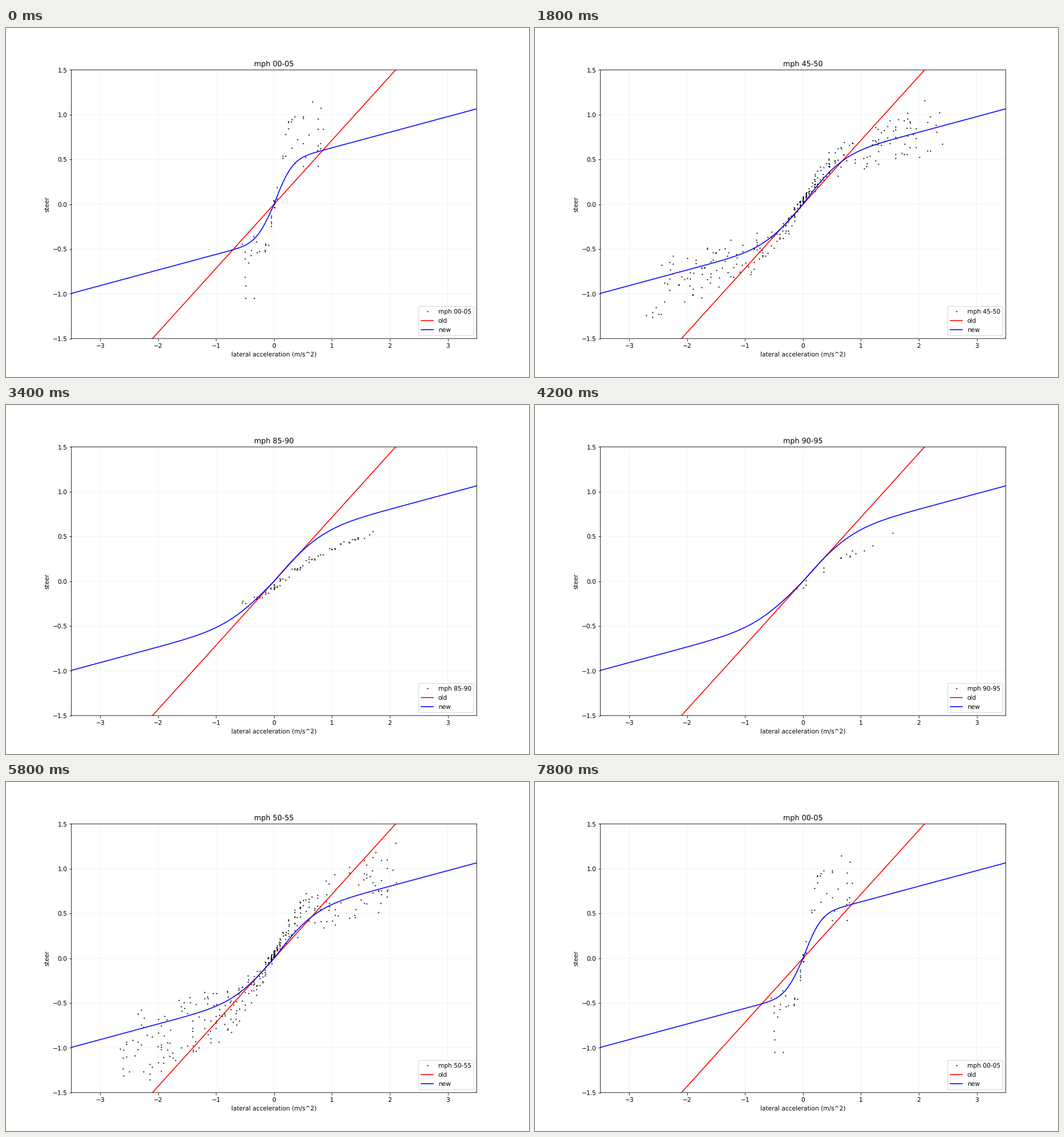
These frames come from a looping animation (917 by 611 pixels, 8000 ms). A matplotlib script:

```python
import math

import matplotlib.pyplot as plt
import numpy as np
from matplotlib.animation import FuncAnimation

WIDTH, HEIGHT, DPI = 917, 611, 76
BANDS = 20      # speed bands of 5 mph each
STEP_MS = 200

# How the driving data changes with speed, given at a few bands.
KEY_BANDS = [0, 1, 5, 10, 14, 18]
TRAITS = {
    "count": [63, 140, 220, 330, 240, 16],
    "left": [0.55, 3.2, 3.25, 2.65, 2.3, 0.1],     # reach of the data in x
    "right": [0.85, 2, 3.4, 2.15, 1.9, 1.8],
    "slope": [0.2, 0.2, 0.16, 0.25, 0.2, 0.27],
    "height": [0.65, 0.5, 0.23, 0.4, 0.18, 0.1],
    "lift": [0, 0, 0.03, 0.05, -0.08, -0.05],      # shift near the centre
    "fan": [0.5, 0.4, 0.06, 0.42, 0.1, 0.04],      # spread growing with steer
}

erf = np.vectorize(math.erf)
xs = np.linspace(-3.5, 3.5, 701)


def gain(band):
    return 1.57 * (28.5 / (5 * band + 3.5)) ** 0.298


def new_steer(band):
    return np.where(xs > 0, 0.456, 0.386) * erf(gain(band) * xs) + 0.174 * xs


def samples(band):
    """Seeded driving samples around an S-shaped response."""
    rng = np.random.default_rng(band)
    p = {k: np.interp(band, KEY_BANDS, v) for k, v in TRAITS.items()}
    n = round(p["count"])
    is_left = rng.random(n) < p["left"] / (p["left"] + p["right"])
    reach = np.where(is_left, -p["left"], p["right"])
    x = np.round(reach * rng.random(n) ** 1.7 * 20) / 20    # bins of 0.05
    y = p["slope"] * x + p["height"] * erf(1.5 * gain(band) * x)
    y *= 1 + p["fan"] * rng.uniform(-1, 1, n)
    y += p["lift"] * np.exp(-3 * x ** 2) + rng.uniform(-0.04, 0.04, n)
    return x + rng.uniform(-0.007, 0.007, n), y


def label(band):
    return f"mph {5 * band:02d}-{5 * band + 5:02d}"


POINTS = [samples(b) for b in range(BANDS)]
CURVES = [new_steer(b) for b in range(BANDS)]

plt.rcParams.update({"font.size": 10.05, "text.hinting": "none",
                     "path.snap": False})
# The small margin keeps the pixel size from rounding down.
fig, ax = plt.subplots(
    figsize=((WIDTH + 0.01) / DPI, (HEIGHT + 0.01) / DPI), dpi=DPI)
dots, = ax.plot([], [], "k.", markersize=2, label=label(0))
ax.plot(xs, xs / 1.4, "r", label="old")
curve, = ax.plot(xs, CURVES[0], "b", label="new")
ax.set(xlim=(-3.5, 3.5), ylim=(-1.5, 1.5),
       xlabel="lateral acceleration (m/s^2)", ylabel="steer")
ax.grid(alpha=0.18)
title = ax.set_title(label(0))
legend = ax.legend(loc="lower right")


def update(i):
    band = min(i, 2 * BANDS - 1 - i)    # up through the speeds, then back
    dots.set_data(*POINTS[band])
    curve.set_ydata(CURVES[band])
    title.set_text(label(band))
    legend.get_texts()[0].set_text(label(band))
    return dots, curve, title, legend


anim = FuncAnimation(fig, update, frames=2 * BANDS, interval=STEP_MS,
                     repeat=True, repeat_delay=0, blit=False)
plt.show()
```
